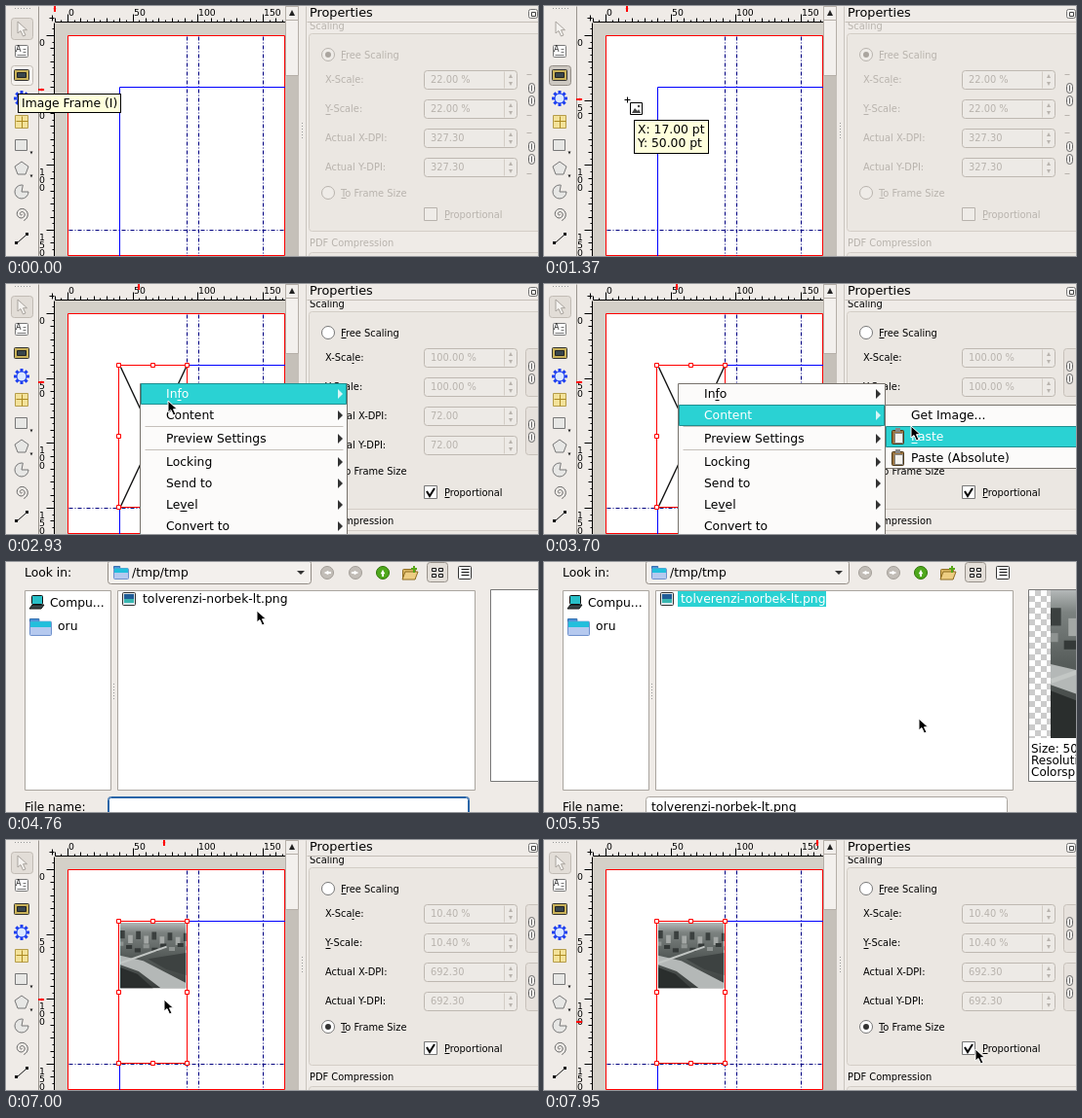
Animation, 545 px wide and 257 px high, one loop 7.99 s. Source, as an HTML page with a canvas:

```html
<!DOCTYPE html>
<html lang="en">
<head>
<meta charset="utf-8">
<title>Placing an image</title>
<style>
html, body { margin: 0; width: 100%; height: 100%; overflow: hidden; background: #efebe7; }
canvas { display: block; }
</style>
</head>
<body>
<canvas id="stage" width="545" height="257"></canvas>
<script>
const c = document.getElementById('stage').getContext('2d');
const LOOP = 7990, BG = '#efebe7', TEAL = '#2ad2d3', RED = '#f00', GREY = '#b8b3ad', EDGE = '#aaa59f';
const FILE = 'tolverenzi-norbek-lt.png';
const DASH_DOT = [4, 2, 1, 2];

// Pointer path: time, x, y
const PATH = [
  [1210, 38, 86], [1370, 85, 96], [1500, 117, 102], [1650, 137, 106], [2230, 137, 106],
  [2320, 136, 101], [2700, 138, 103], [2930, 166, 120], [3010, 171, 122], [3080, 177, 124],
  [3180, 195, 133], [3400, 290, 138], [3560, 352, 143], [3700, 376, 146], [3820, 387, 136],
  [3900, 386, 132], [4300, 386, 132], [4500, 340, 101], [4760, 257, 50], [4900, 241, 42],
  [5030, 234, 39], [5310, 234, 39], [5500, 350, 130], [5690, 476, 246], [5750, 487, 264],
  [6500, 487, 264], [6750, 284, 200], [7000, 162, 164], [7230, 150, 162], [7500, 283, 187],
  [7750, 396, 207], [7950, 442, 215]
];

function pointerAt(t) {
  const i = PATH.findIndex(p => p[0] > t);
  if (i < 0) return PATH[PATH.length - 1].slice(1);
  if (i === 0) return PATH[0].slice(1);
  const [a, b] = [PATH[i - 1], PATH[i]], k = (t - a[0]) / (b[0] - a[0]);
  return [1, 2].map(n => Math.round(a[n] + (b[n] - a[n]) * k));
}

function box(x, y, w, h, fill, stroke, r = 0) {
  c.beginPath();
  c.roundRect(x + (stroke ? .5 : 0), y + (stroke ? .5 : 0), w - (stroke ? 1 : 0), h - (stroke ? 1 : 0), r);
  if (fill) { c.fillStyle = fill; c.fill(); }
  if (stroke) { c.strokeStyle = stroke; c.lineWidth = 1; c.stroke(); }
}
function line(x1, y1, x2, y2, color = '#000', width = 1, dash = []) {
  const o = width % 2 ? .5 : 0;
  c.beginPath();
  c.moveTo(x1 + o, y1 + o);
  c.lineTo(x2 + o, y2 + o);
  c.strokeStyle = color; c.lineWidth = width;
  c.setLineDash(dash); c.stroke(); c.setLineDash([]);
}
function poly(points, fill, stroke, width = 1) {
  c.beginPath();
  points.forEach(p => c.lineTo(p[0], p[1]));
  c.closePath();
  if (fill) { c.fillStyle = fill; c.fill(); }
  if (stroke) { c.strokeStyle = stroke; c.lineWidth = width; c.stroke(); }
}
function disc(x, y, r, fill, stroke) {
  c.beginPath();
  c.arc(x, y, r, 0, 7);
  if (fill) { c.fillStyle = fill; c.fill(); }
  if (stroke) { c.strokeStyle = stroke; c.lineWidth = 1; c.stroke(); }
}
// The optional last argument is the index of the underlined letter.
function text(s, x, y, color = '#000', size = 12.35, underline = -1) {
  c.font = size + 'px "DejaVu Sans", sans-serif';
  c.textBaseline = 'middle';
  c.fillStyle = color;
  c.fillText(s, x, y + .5);
  if (underline < 0) return;
  const from = x + c.measureText(s.slice(0, underline)).width;
  const to = from + c.measureText(s[underline]).width;
  line(Math.round(from), Math.round(y + size / 2), Math.round(to) - 1, Math.round(y + size / 2), color);
}
const small = (s, x, y, color, underline) => text(s, x, y, color, 9.85, underline);
function clipped(x, y, w, h, draw) {
  c.save();
  c.beginPath(); c.rect(x, y, w, h); c.clip();
  draw();
  c.restore();
}
const triangle = (x, y, dx, dy, color) =>
  poly([[x + dx, y + dy], [x - dx + dy, y - dy + dx], [x - dx - dy, y - dy - dx]], color);

function arrow(x, y, fill = '#000', stroke = '#fff') {
  const shape = [[0, 0], [0, 12], [3, 9.5], [5.5, 15], [8, 14], [5.5, 8.7], [9.5, 8.7]];
  poly(shape.map(p => [x + p[0], y + p[1]]), fill, stroke);
}

function photo(x, y, size) {
  clipped(x, y, size, size, () => {
    c.translate(x, y);
    c.scale(size / 100, size / 100);
    const g = c.createLinearGradient(0, 0, 0, 100);
    g.addColorStop(0, '#b4b8b8'); g.addColorStop(.15, '#7c8280');
    g.addColorStop(.5, '#565c5a'); g.addColorStop(1, '#3a3e3d');
    box(0, 0, 100, 100, g);
    for (let i = 0; i < 9; i++) {
      box(i * 12, 12 + i * 7 % 13, 7, 12, i % 2 ? '#a4a8a6' : '#3b403f');
      box(i * 13 - 4, 29 + i * 5 % 11, 9, 6, i % 3 ? '#343938' : '#8e9391');
    }
    poly([[0, 50], [35, 58], [100, 92], [100, 100], [62, 100], [28, 74], [0, 64]], '#b4b8b7');
    poly([[0, 68], [26, 78], [50, 100], [0, 100]], '#2a2e2d');
    poly([[42, 55], [100, 46], [100, 80], [70, 71]], '#3d4241');
    line(0, 61, 70, 36, '#c3c7c5', 3);
  });
}

function tools(t) {
  const x = 16, picking = t >= 700 && t < 2050;
  for (let d = 9; d < 25; d += 3) box(d, 2, 1, 1, '#999');
  if (t < 850 || t >= 2050) box(5, 12, 23, 23, '#e2ddd7', '#c1bbb4', 3);
  if (t < 2050) box(5, 61, 23, 21, picking ? '#cdc8c1' : '#f5f2ef', picking ? '#938d86' : '#c1bbb4', 3);
  arrow(12, 16, '#f5f3f0', '#a8a39d');
  box(9, 40, 14, 13, '#fff', '#777', 1);
  text('A', 10, 44, '#222', 8);
  [44, 47, 50].forEach(y => line(y < 50 ? 17 : 11, y, 20, y, '#777'));
  box(8, 65, 16, 12, '#c9b25a', '#333', 1);
  box(11, 68, 10, 6, '#39464c', '#222');
  for (let i = 0; i < 8; i++) {
    const a = i * Math.PI / 4;
    c.beginPath();
    c.moveTo(x + 4 * Math.cos(a), 95 + 4 * Math.sin(a));
    c.lineTo(x + 8 * Math.cos(a), 95 + 8 * Math.sin(a));
    c.strokeStyle = '#1d3ff0'; c.lineWidth = 3; c.stroke();
  }
  disc(x, 95, 5, '#dbe8ff', '#1d3ff0');
  box(9, 112, 14, 14, '#f3e29a', '#b59c4a');
  line(16, 113, 16, 125, '#ad8a21'); line(10, 118, 22, 118, '#ad8a21');
  box(9, 137, 13, 12, '#e7e7e5', '#777');
  poly([[16, 160], [23, 165], [20, 173], [12, 173], [9, 165]], '#e7e7e5', '#777');
  [151, 175].forEach(y => triangle(26, y, 0, 1.5, '#222'));
  c.beginPath();
  c.moveTo(16, 191); c.arc(16, 191, 7, 0, 4.9); c.closePath();
  c.fillStyle = '#e7e7e5'; c.fill(); c.strokeStyle = '#777'; c.stroke();
  c.beginPath();
  for (let a = 0; a < 14; a += .3) c.lineTo(x + a * .5 * Math.cos(a), 214 + a * .5 * Math.sin(a));
  c.strokeStyle = '#666'; c.stroke();
  line(11, 243, 20, 235, '#111');
  box(9, 242, 3, 3, '#111'); box(20, 233, 3, 3, '#111');
}

function rulers([mx, my]) {
  box(33, 0, 253, 17, BG); box(33, 17, 17, 240, BG);
  line(33, 0, 33, 257, '#9a958f');
  line(44, 12, 49, 12); line(47, 9, 47, 15);
  for (let pt = -50; pt <= 175; pt += 5) {
    const x = Math.round(63 + pt * 4 / 3), y = Math.round(30 + pt * 4 / 3);
    const len = pt % 50 === 0 ? 9 : pt % 10 === 0 ? 5 : 3;
    if (x > 49 && x < 286) line(x, 17 - len, x, 16);
    if (y > 17) line(50 - len, y, 49, y);
    if (pt < 0 || pt % 50) continue;
    text(pt, x + 1, 7, '#000', 9.3);
    [...String(pt)].forEach((d, i) => text(d, 34, y + 8 + i * 8, '#000', 9.3));
  }
  line(50, 16, 286, 16); line(49, 17, 49, 257);
  box(mx - 1, 0, 2, 6, RED); box(33, my - 1, 6, 2, RED);
  triangle(mx, 4, 0, 1.5, RED); triangle(38, my, 1.5, 0, RED);
}

function page(t) {
  const placed = t >= 2050, loaded = t >= 6450, selected = placed && (t < 6400 || loaded);
  clipped(50, 17, 236, 240, () => {
    box(50, 17, 236, 240, '#d4d0c8');
    box(63, 30, 223, 227, '#fff', RED);
    line(286, 31, 286, 257, '#fff');
    [185, 197, 263].forEach(x => line(x, 31, x, 257, '#000080', 1, DASH_DOT));
    line(64, 230, 286, 230, '#000080', 1, DASH_DOT);
    line(116, 83, 286, 83, '#00f');
    line(116, 83, 116, 257, '#00f');
    if (!placed) return;
    box(115, 83, 71, 147, '#fff', selected ? RED : '#333');
    if (loaded) photo(117, 85, 67.5);
    else { line(117, 85, 184, 228, '#111', 1.4); line(184, 85, 117, 228, '#111', 1.4); }
    if (!selected) return;
    for (const x of [115, 150, 185]) for (const y of [83, 156, 229])
      if (x !== 150 || y !== 156) box(x - 2, y - 2, 5, 5, '#fff', RED);
  });
}

function scrollbar() {
  box(286, 0, 14, 257, '#c5c0b9');
  box(286, 0, 14, 15, '#f1eeeb', '#b5afa8');
  triangle(293, 7, 0, -3, '#222');
  box(286, 14, 14, 58, '#f3f0ed', '#b5afa8');
}

function properties(t) {
  const on = t >= 2050, ink = on ? '#000' : GREY, edge = on ? '#777' : GREY;
  box(300, 0, 245, 257, BG);
  for (let y = 120; y < 138; y += 3) box(303, y, 1, 1, '#999');
  line(307, 0, 307, 257, '#cac5be');
  text('Properties', 311, 7.5, '#000', 12.8);
  box(535, 3, 10, 10, '#f5f3f0', '#777', 2); box(538, 6, 5, 5, null, '#444');
  line(308, 16, 545, 16, '#c4beb7');
  clipped(308, 17, 237, 20, () => small('Scaling', 311, 20.5, ink));
  box(310, 28, 240, 204, '#ebe7e2', '#d3cdc6', 3);

  const radio = (y, label, checked) => {
    disc(330, y, 6.5, on ? '#fff' : '#efece8', edge);
    if (checked) disc(330, y, 3, on ? '#333' : '#aaa59f');
    small(label, 343, y + .5, ink, 0);
  };
  radio(50, 'Free Scaling', !on);
  radio(192, 'To Frame Size', on);
  const [scale, dpi] = !on ? ['22.00 %', '327.30'] : t < 6450 ? ['100.00 %', '72.00'] : ['10.40 %', '692.30'];
  [['X-Scale:', 5], ['Y-Scale:', 0], ['Actual X-DPI:'], ['Actual Y-DPI:']].forEach(([label, underline], i) => {
    const y = 76 + i * 30;
    small(label, 327, y, ink, underline);
    box(428, y - 10, 96, 20, '#edeae6', '#beb8b1', 3);
    line(510, y - 9, 510, y + 8, '#d3cdc6');
    triangle(517, y - 4, 0, -2, GREY); triangle(517, y + 4, 0, 2, GREY);
    small(i < 2 ? scale : dpi, 435, y, GREY);
  });
  [91, 151].forEach(y => {
    if (on) box(532, y - 25, 16, 50, '#e6e1dc', '#c7c1ba', 3);
    else { line(533, y - 21, 538, y - 21, GREY); line(533, y + 21, 538, y + 21, GREY); }
    [-7, 6].forEach(d => {
      box(535, y + d - 5, 7, 11, '#f3f0ed', '#666', 3);
      line(538, y + d - 3, 538, y + d + 3, '#666');
    });
  });
  box(428, 207, 14, 14, on ? '#fff' : '#efece8', edge);
  if (on) {
    c.beginPath(); c.moveTo(431, 213); c.lineTo(434, 218); c.lineTo(439, 210);
    c.strokeStyle = '#000'; c.lineWidth = 2; c.stroke();
  }
  small('Proportional', 449, 214.5, ink, 0);
  small('PDF Compression', 311, 244, ink);
  box(310, 253, 240, 20, '#ebe7e2', '#d3cdc6', 3);
}

function menuRow(label, x, y, textX, right, active, underline) {
  if (active) box(x + 1, y - 11, right - x - 2, 22, TEAL, '#1f8f90');
  text(label, textX, y, active ? '#fff' : '#000', 12.35, underline);
}

function menus(t, [px, py]) {
  if (t < 2620 || t >= 4240) return;
  const active = px < 141 ? -1 : py < 124 ? 0 : 1;
  box(137, 102, 213, 180, '#fcfbfa', '#77726c');
  [['Info', 113, 2], ['Content', 135], ['Preview Settings', 159], ['Locking', 183], ['Send to', 205], ['Level', 227, 2], ['Convert to', 249]]
    .forEach(([label, y, underline], i) => {
      menuRow(label, 137, y, 164, 350, i === active, underline);
      poly([[340, y - 5], [345, y], [340, y + 5]], i === active ? '#d8f6f6' : '#333');
    });
  [146, 170].forEach(y => line(142, y, 345, y, '#c5c0ba'));
  if (t >= 3010 && t < 3080) {
    box(349, 102, 109, 68, '#fcfbfa', '#77726c');
    ['Image', 'No Image', 'Print: Enabled'].forEach((s, i) => menuRow(s, 349, 113 + i * 22, 358, 458, false));
  }
  if (t < 3300) return;
  box(349, 124, 200, 66, '#fcfbfa', '#77726c');
  const row = px < 350 ? -1 : py < 146 ? 0 : 1;
  ['Get Image...', 'Paste', 'Paste (Absolute)'].forEach((label, i) => {
    const y = 135 + i * 22;
    menuRow(label, 349, y, 376, 549, i === row, i === 1 ? 0 : undefined);
    if (!i) return;
    box(356, y - 7, 13, 15, '#9a7440', '#4c3818', 1);
    box(359, y - 4, 9, 11, '#f5f3ee', '#888');
    box(360, y - 9, 5, 4, '#888');
  });
}

function folder(x, y, w, h) {
  box(x, y, w * .45, h * .3, '#4a90d9', '#356fae');
  box(x, y + h * .15, w, h * .85, '#b5c9ef', '#6d90cc', 1);
  box(x + 1, y + h * .18, w - 2, h * .32, '#22bfdc');
}

function dialog(t) {
  const chosen = t >= 5030;
  box(0, 0, 545, 257, BG);
  text('Look in:', 19, 11);
  box(104, -2, 209, 25, '#f3f0ed', '#928c85', 3);
  folder(110, 4, 16, 14);
  text('/tmp/tmp', 129, 11);
  poly([[298, 9], [306, 9], [302, 13]], '#333');
  [[329, 0, -1], [358, 0, 1], [386, 1, -1]].forEach(([x, up, d]) => {
    disc(x, 11, 6.5, up ? '#4fa81c' : '#c2bdb7', up ? '#2f7508' : '#a39e98');
    triangle(x + (up ? 0 : d), 11 - (up ? 1 : 0), up ? 0 : 2.3 * d, up ? -2.3 : 0, '#fff');
    box(up ? x - 1 : x - (d > 0 ? 4 : 0), up ? 11 : 10, up ? 2 : 4, up ? 4 : 2, '#fff');
  });
  box(406, 7, 14, 11, '#d9b460', '#8f6c20', 1);
  poly([[406, 18], [409, 10], [422, 10], [419, 18]], '#edcd82', '#8f6c20');
  box(417, 4, 2, 7, '#58a618'); box(415, 6, 6, 2, '#58a618');
  box(431, 0, 22, 21, '#e3ded8', '#97918a', 3);
  for (const x of [436, 443]) for (const y of [6, 12]) box(x, y, 5, 4, '#fff', '#111');
  box(463, 4, 14, 14, '#fff', '#333', 1);
  [7, 10, 13].forEach(y => line(466, y, 474, y, '#111'));

  box(19, 29, 89, 206, '#fff', EDGE);
  box(26, 34, 12, 10, '#28c0c8', '#111', 1);
  poly([[24, 48], [27, 44], [39, 44], [36, 48]], '#394648', '#111');
  text('Compu...', 45, 42);
  folder(24, 58, 23, 18);
  text('oru', 53, 66);
  for (let y = 125; y < 142; y += 3) box(110, y, 1, 1, '#999');

  box(114, 29, 367, 206, '#fff', EDGE);
  const marked = t >= 5070, dimmed = t >= 6080 && t < 6250;
  if (marked) box(137, 30, 152, 16, dimmed ? '#d4d0c8' : TEAL);
  box(119, 31, 14, 14, '#dfe7ec', '#333', 1);
  box(121, 33, 10, 9, '#1f5c96'); box(121, 38, 10, 4, '#38b6b0');
  text(FILE, 140, 38, marked && !dimmed ? '#fff' : '#000');

  box(496, 28, 60, 198, '#fff', '#777');
  if (chosen) {
    clipped(497, 29, 48, 152, () => {
      for (let x = 0; x < 4; x++) for (let y = 0; y < 26; y++)
        if ((x + y) % 2) box(497 + x * 6, 29 + y * 6, 6, 6, '#cbcbcb');
      photo(519, 29, 152);
    });
    ['Size: 500', 'Resolution', 'Colorspace'].forEach((s, i) => text(s, 499, 192 + i * 12, '#000', 12));
  }
  text('File name:', 19, 252, '#000', 12.1);
  box(104, 241, 371, 24, '#fff', chosen ? EDGE : '#2a66a8', 3);
  if (!chosen) box(105, 242, 369, 24, null, '#2a66a8', 2);
  if (marked) text(FILE, 110, 252);
}

function tip(x, y, w, h, rows) {
  box(x, y, w, h, '#000');
  box(x + 1, y + 1, w - 2, h - 2, '#ffffdc');
  rows.forEach((s, i) => text(s, x + 4, y + 10 + i * 14));
}

function placingCursor(t, [x, y]) {
  line(x - 3, y, x + 3, y); line(x, y - 3, x, y + 3);
  box(x + 3, y + 3, 13, 13, '#fff', '#000');
  poly([[x + 5, y + 14], [x + 8, y + 9], [x + 11, y + 12], [x + 12, y + 10], [x + 14, y + 14]], '#444');
  disc(x + 12, y + 7, 1.2, '#444');
  if (t >= 1820 || x < 50) return;
  const points = (v, origin) => Math.round((v - origin) * .75).toFixed(2) + ' pt';
  tip(x + 7, y + 21, 77, 35, ['X: ' + points(x, 63), 'Y: ' + points(y, 30)]);
}

function render(t) {
  const pointer = pointerAt(t);
  const mark = t < 1210 ? [50, 86] : t < 2620 ? pointer : t < 6750 ? [136, 101] : t < 7490 ? pointer : [280, 187];
  if (t >= 4400 && t < 6450) {
    dialog(t);
    if (t >= 6400) {
      page(t);
      box(286, 30, 3, 16, TEAL);
      box(4, 12, 24, 23, BG);
      arrow(11, 16, '#f5f3f0', '#b5b0aa');
    }
  } else {
    box(0, 0, 545, 257, BG);
    tools(t);
    rulers(mark);
    page(t);
    scrollbar();
    properties(t);
    menus(t, pointer);
    if (t < 680) tip(12, 90, 106, 20, ['Image Frame (I)']);
  }
  if (t >= 2050) arrow(...pointer);
  else if (t >= 1210) placingCursor(t, pointer);
}

function tick() {
  render(performance.now() % LOOP);
  requestAnimationFrame(tick);
}
tick();
</script>
</body>
</html>
```
